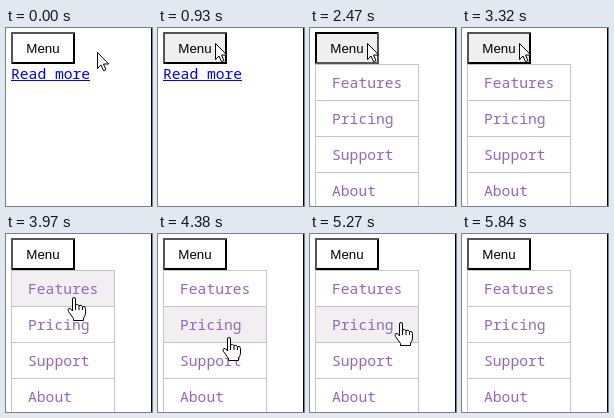
Write an HTML page that moves like this. It is 146 by 178 pixels and loops after 6.12 s.

```html
<!DOCTYPE html>
<html lang="en">
<head>
<meta charset="utf-8">
<title>Dropdown menu</title>
<style>
  html, body { margin: 0; width: 100%; height: 100%; overflow: hidden; background: #fff; }
  svg { display: block; width: 146px; height: 178px; }
  text { white-space: pre; }
  .mono { font: 14.66px "Noto Sans Mono", "DejaVu Sans Mono", monospace; }
  .label { font: 13.333px "Liberation Sans", Arial, sans-serif; }
  .face { fill: #fff; }
  .hover .face { fill: #efefef; }
  .lit { fill: #555; }
  .shade { fill: #000; }
  .pressed .lit { fill: #000; }
  .pressed .shade { fill: #555; }
  .row rect { fill: #fff; stroke: #c4c4c4; }
  .row.hover rect { fill: #f1eff2; }
  .row text { fill: #9468b8; }
  .cursor path { fill: #fff; stroke: #000; stroke-linejoin: round; }
  .cursor .crease { fill: none; }
</style>
</head>
<body>
<svg viewBox="0 0 146 178">
  <g id="link">
    <text class="mono" x="5" y="51" fill="#00e">Read more</text>
    <rect x="5" y="52" width="79" height="1" fill="#00e"/>
  </g>
  <g id="menu"></g>
  <g id="button">
    <rect class="face" x="5" y="4" width="64" height="32"/>
    <path class="lit" d="M5 36V4H69L67 6H7V34Z"/>
    <path class="shade" d="M69 4V36H5L7 34H67V6Z"/>
    <text class="label" x="20.3" y="25">Menu</text>
  </g>
  <rect x="145" width="1" height="178"/>
  <g id="arrow" class="cursor">
    <path d="M.5 .5V16.5L4 13L6.6 18.7L9 17.6L6.5 12H11.8Z"/>
  </g>
  <g id="hand" class="cursor">
    <path d="M-1.5 14V2Q-1.5 .5 0 .5T1.5 2V8Q3.5 6.5 5 8.7Q7 7.3 8.5 9.5Q11.5 8.7 11.5 11.5V16Q11.5 18.5 9.5 21V23.5H-.5V21.5L-5.5 14.5Q-7 12 -5 11.5T-1.5 14Z"/>
    <path class="crease" d="M1.5 8V13M5 9V13M8.5 10V13"/>
  </g>
</svg>
<script>
const LOOP = 6120;
const ROW = 36;
const ITEMS = ["Features", "Pricing", "Support", "About"];

// Pointer way-points: time, x, y
const PATH = [
  [450, 91, 24], [930, 57, 15], [3610, 57, 15], [3970, 68, 63], [4780, 74, 141],
  [4910, 80, 132], [5300, 92, 85], [5550, 103, 110], [5800, 101, 179]
];
const PRESSED = [[1140, 1460], [2470, 2840], [3200, 3320]];
const OPEN = [[1460, 2840], [3320, LOOP]];

const $ = id => document.getElementById(id);
const [link, menu, button, arrow, hand] = ["link", "menu", "button", "arrow", "hand"].map($);

menu.innerHTML = ITEMS.map((name, i) => `
  <g class="row">
    <rect x="5.5" y="${36.5 + i * ROW}" width="103" height="${ROW}"/>
    <text class="mono" x="22" y="${60 + i * ROW}">${name}</text>
  </g>`).join("");
const rows = [...menu.children];

const within = (spans, t) => spans.some(([from, to]) => t >= from && t < to);
const show = (node, on) => { node.style.display = on ? "" : "none"; };

function pointerAt(t) {
  const next = PATH.findIndex(p => p[0] > t);
  if (next === 0) return PATH[0].slice(1);
  if (next < 0) return PATH[PATH.length - 1].slice(1);
  const [t0, x0, y0] = PATH[next - 1];
  const [t1, x1, y1] = PATH[next];
  let k = (t - t0) / (t1 - t0);
  if (next === 1) k = k * k * (3 - 2 * k);
  return [Math.round(x0 + (x1 - x0) * k), Math.round(y0 + (y1 - y0) * k)];
}

function draw(t) {
  const [x, y] = pointerAt(t);
  const open = within(OPEN, t);
  const row = open && y > 36 && x < 109 ? Math.floor((y - 36) / ROW) : -1;
  const visible = t < 5840;

  show(link, !open);
  show(menu, open);
  rows.forEach((node, i) => node.classList.toggle("hover", visible && i === row));
  button.classList.toggle("hover", x < 69 && y < 36);
  button.classList.toggle("pressed", within(PRESSED, t));

  show(arrow, visible && row < 0);
  show(hand, visible && row >= 0);
  for (const cursor of [arrow, hand]) cursor.setAttribute("transform", `translate(${x} ${y})`);
}

const start = performance.now();
function tick() {
  draw((performance.now() - start) % LOOP);
  requestAnimationFrame(tick);
}
tick();
</script>
</body>
</html>
```
